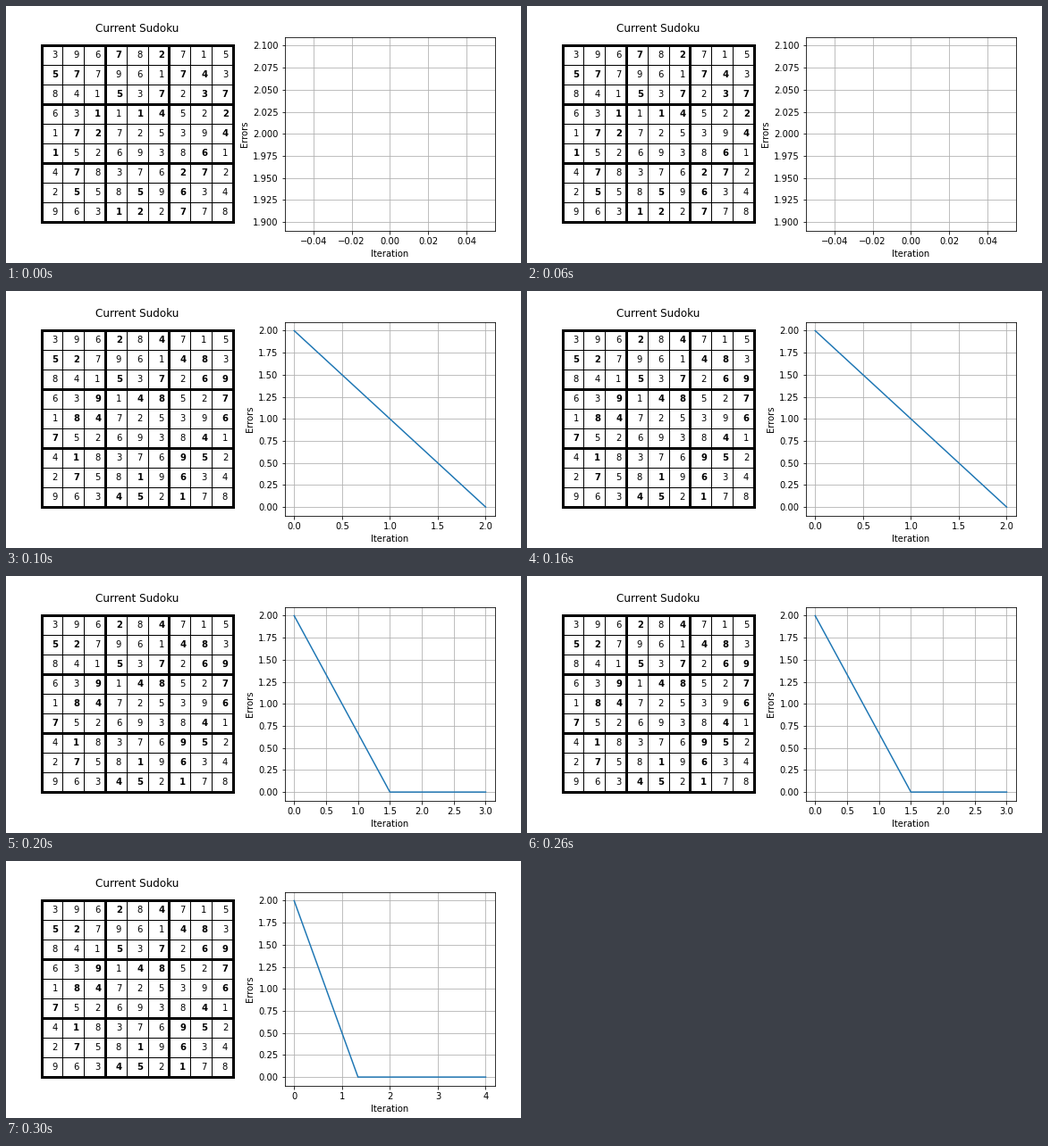
Write a matplotlib script that moves like this. It is 576 px wide and 288 px high and loops after 400 ms.

```python
import numpy as np
import matplotlib.pyplot as plt
from matplotlib.animation import FuncAnimation

# Random fill of the empty cells, and the solved board
START = ["396782715", "577961743", "841537237",
         "631114522", "172725394", "152693861",
         "478376272", "255859634", "963122778"]
SOLVED = ["396284715", "527961483", "841537269",
          "639148527", "184725396", "752693841",
          "418376952", "275819634", "963452178"]
# Columns of the cells that were empty (bold), row by row
EMPTY = ["35", "0167", "3578", "2458", "128", "07", "167", "146", "346"]

plt.rcParams["font.family"] = "DejaVu Sans"
fig, (board_ax, error_ax) = plt.subplots(1, 2, figsize=(8, 4), dpi=72)
fig.subplots_adjust(left=0.05, right=0.95, bottom=0.125, top=0.88, wspace=0.2)


def draw_board():
    board_ax.set_title("Current Sudoku")
    board_ax.axis("off")
    for i in range(10):
        width = 3 if i % 3 == 0 else 1
        board_ax.plot([i, i], [0, 9], color="black", lw=width)
        board_ax.plot([0, 9], [i, i], color="black", lw=width)
    return [[board_ax.text(c + 0.5, 8.5 - r, "", va="center",
                           weight="bold" if str(c) in EMPTY[r] else "normal")
             for c in range(9)] for r in range(9)]


cells = draw_board()


def update(step):
    board = SOLVED if step else START
    for texts, row in zip(cells, board):
        for text, digit in zip(texts, row):
            text.set_text(digit)

    # The history starts at two errors and is solved one step later
    errors = [2] + [0] * step
    if step:
        iterations = np.linspace(0, step + 1, step + 1)
    else:
        iterations = [0]
    error_ax.clear()
    error_ax.plot(iterations, errors)
    error_ax.set_xlabel("Iteration")
    error_ax.set_ylabel("Errors")
    error_ax.grid(True)


anim = FuncAnimation(fig, update, frames=4, interval=100,
                     repeat=True, repeat_delay=0)
plt.show()
```
